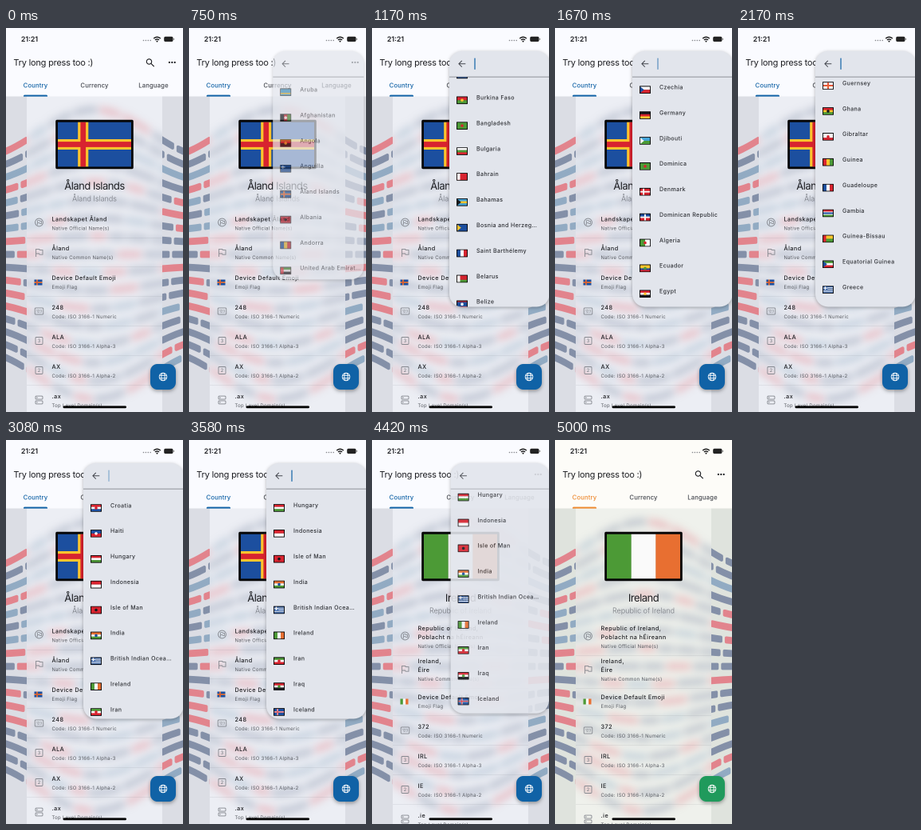
These frames come from a looping animation (222 px wide and 480 px high, 6.83 s). An HTML page with a canvas:

```html
<!DOCTYPE html>
<html lang="en">
<head>
<meta charset="utf-8">
<title>Countries</title>
<style>
html, body { margin: 0; width: 100%; height: 100%; overflow: hidden; background: #fafbff; }
canvas { display: block; width: 100vw; height: 100vh; }
</style>
</head>
<body>
<canvas id="stage"></canvas>
<script>
const W = 222, H = 480, LOOP = 6830, STEP = 1000 / 12;
const OPEN = 540, CLOSE = 4385, MORPH = 600, ROW = 31.88;
const SCALE = Math.max(2, Math.ceil(devicePixelRatio || 1));
const FONT = 'Inter, Roboto, sans-serif';

const makeLayer = el => {
  const c = el || document.createElement('canvas');
  c.width = W * SCALE;
  c.height = H * SCALE;
  const g = c.getContext('2d');
  g.scale(SCALE, SCALE);
  return g;
};
const stage = makeLayer(document.getElementById('stage'));
const sheet = makeLayer();

// Name:flag. h/v stripes, then * disc, + nordic cross, = cross, < triangle, | hoist band, ^ canton
const COUNTRIES = (
  'Aruba:hcccyc;Afghanistan:vkrg*w;Angola:hrk*y;Anguilla:hb^;Åland Islands:hb+yr;Albania:hr*k;Andorra:vbyr;' +
  'United Arab Emirat…:hgwk|r;Argentina:hcwc*y;Armenia:hrbo;American Samoa:hb<w;Antarctica:hb*w;' +
  'French Southern Ter…:hb*w;Antigua and Barbu…:hkcw;Australia:hb^;Austria:hrwr;Azerbaijan:hcrg*w;' +
  'Burundi:hrg*w;Belgium:vkyr;Benin:hyr|g;Caribbean Netherl…:hwwb;Burkina Faso:hrg*y;Bangladesh:hg*r;' +
  'Bulgaria:hwgr;Bahrain:hr|w;Bahamas:hcyc<k;Bosnia and Herzeg…:hb<y;Saint Barthélemy:vbwr;' +
  'Belarus:hrrg|w;Belize:hrbbbbr*w;Bermuda:hr^;Bolivia:hryg;Brazil:hg*y;Barbados:vbyb*k;Brunei:hywky;' +
  'Bhutan:hyo*w;Bouvet Island:hr+wb;Botswana:hcckcc;Central African Re…:hbwgy;Canada:vrwwr*r;' +
  'Cocos Islands:hg*y;Switzerland:hr=ww;Chile:hwr|b;China:hr*y;Ivory Coast:vowg;Cameroon:vgry*y;' +
  'DR Congo:hc*y;Congo:vgyr;Cook Islands:hb^;Colombia:hyybr;Comoros:hywrb<g;Cape Verde:hbbwrwb;' +
  'Costa Rica:hbwrrwb;Cuba:hbwbwb<r;Curaçao:hbbbyb;Christmas Island:hbg*y;Cayman Islands:hb^;' +
  'Cyprus:hw*o;Czechia:hwr<b;Germany:hkry;Djibouti:hcg<w;Dominica:hg*r;Denmark:hr+ww;' +
  'Dominican Republic:hbr=ww;Algeria:vgw*r;Ecuador:hyybr*g;Egypt:hrwk*y;Eritrea:hgc<r;' +
  'Western Sahara:hkwg<r;Spain:hryyr*r;Estonia:hbkw;Ethiopia:hgyr*b;Finland:hw+bb;Fiji:hc^;' +
  'Falkland Islands:hb^;France:vbwr;Faroe Islands:hw+br;Micronesia:hc*w;Gabon:hgyb;' +
  'United Kingdom:hb=wr;Georgia:hw=rr;Guernsey:hw=ry;Ghana:hryg*k;Gibraltar:hwwr*r;Guinea:vryg;' +
  'Guadeloupe:vbwr;Gambia:hrrwbbwgg;Guinea-Bissau:hyg|r;Equatorial Guinea:hgwr<b;' +
  'Greece:hbwbwbwbwb^;Grenada:hryyr*g;Greenland:hwr*r;Guatemala:vcwc;French Guiana:hgy*r;' +
  'Guam:hb*w;Guyana:hg<y;Hong Kong:hr*w;Heard and McDon…:hb^;Honduras:hcwc*c;Croatia:hrwb*r;' +
  'Haiti:hbr*w;Hungary:hrwg;Indonesia:hrw;Isle of Man:hr*k;India:howg*b;' +
  'British Indian Ocea…:hbwbwbwb^;Ireland:vgwo;Iran:hgwr*r;Iraq:hrwk*g;Iceland:hb+wr;' +
  'Israel:hbwwb*b;Italy:vgwr;Jamaica:hgyk'
).split(';').map(s => s.split(':'));

const INK = { r: '#d8232f', w: '#fafafa', b: '#1c4f9f', g: '#4c9a36', y: '#fdc52d', o: '#e86f31', k: '#17181c', c: '#45a5d8' };

const THEMES = [
  { bar: [250, 251, 255], body: [219, 221, 228], mid: [236, 238, 244], tab: [16, 98, 166], fab: [16, 98, 166] },
  { bar: [253, 252, 248], body: [223, 227, 221], mid: [239, 241, 236], tab: [238, 138, 48], fab: [32, 154, 92] }
];

const PAGES = [
  { flag: 'hb+yr', title: 'Åland Islands', sub: 'Åland Islands', rows: [
    [243, 239, ['Landskapet Åland'], 'Native Official Name(s)'],
    [281, 275.5, ['Åland'], 'Native Common Name(s)'],
    [318, 312.5, ['Device Default Emoji'], 'Emoji Flag'],
    [354, 349.5, ['248'], 'Code: ISO 3166-1 Numeric'],
    [391, 386.5, ['ALA'], 'Code: ISO 3166-1 Alpha-3'],
    [428, 423.5, ['AX'], 'Code: ISO 3166-1 Alpha-2'],
    [465, 460.5, ['.ax'], 'Top Level Domain(s)']] },
  { flag: 'vgwo', title: 'Ireland', sub: 'Republic of Ireland', rows: [
    [245, 235.5, ['Republic of Ireland,', 'Poblacht na hÉireann'], 'Native Official Name(s)'],
    [287, 276.5, ['Ireland,', 'Éire'], 'Native Common Name(s)'],
    [327, 321.5, ['Device Default Emoji'], 'Emoji Flag'],
    [363, 358.5, ['372'], 'Code: ISO 3166-1 Numeric'],
    [400, 395.5, ['IRL'], 'Code: ISO 3166-1 Alpha-3'],
    [437, 432.5, ['IE'], 'Code: ISO 3166-1 Alpha-2'],
    [474, 469.5, ['.ie'], 'Top Level Domain(s)']] }
];

const clamp = v => Math.min(1, Math.max(0, v));
const span = (t, a, b) => clamp((t - a) / (b - a));
const mix = (a, b, k) => `rgb(${a.map((v, i) => Math.round(v + (b[i] - v) * k))})`;

function bezier(x1, y1, x2, y2, x) {
  const at = (a, b, s) => 3 * a * s * (1 - s) ** 2 + 3 * b * s * s * (1 - s) + s ** 3;
  let lo = 0, hi = 1;
  for (let i = 0; i < 24; i++) {
    const m = (lo + hi) / 2;
    if (at(x1, x2, m) < x) lo = m; else hi = m;
  }
  return at(y1, y2, lo);
}

// Material "emphasized" easing
function emphasized(u) {
  const k = 1 / 6;
  return u < k ? 0.4 * bezier(0.3, 0, 0.8, 0.15, u / k)
    : 0.4 + 0.6 * bezier(0.05, 0.7, 0.1, 1, (u - k) / (1 - k));
}

// A drag, then one long fling
function scrollAt(t) {
  const fling = 1166.7;
  if (t < fling) return 659.5 * span(t, 850, fling) ** 1.42;
  return 3221.5 - 2562 * (1 - span(t, fling, fling + 2880)) ** 3.285;
}

function rect(g, x, y, w, h, fill, r = 0) {
  g.fillStyle = fill;
  g.beginPath();
  g.roundRect(x, y, w, h, r);
  g.fill();
}
function disc(g, x, y, r, fill) {
  g.fillStyle = fill;
  g.beginPath();
  g.arc(x, y, r, 0, 7);
  g.fill();
}
function stroke(g, path, color, width = 0.9) {
  g.strokeStyle = color;
  g.lineWidth = width;
  g.stroke(new Path2D(path));
}
function text(g, s, x, y, size, { weight = 400, color = '#1b1c20', gap = 0, align = 'left' } = {}) {
  g.font = `${weight} ${size}px ${FONT}`;
  g.letterSpacing = gap + 'px';
  g.textAlign = align;
  g.fillStyle = color;
  g.fillText(s, x, y + size * 0.36);
}

function flag(g, spec, x, y, w, h) {
  const [, dir, bands, mark, tint] = /^([hv])([a-z]+)([*+=<|^]?)(\w*)$/.exec(spec);
  const n = bands.length;
  const [a, b] = [...tint].map(c => INK[c]);
  g.save();
  g.beginPath();
  g.rect(x, y, w, h);
  g.clip();
  [...bands].forEach((c, i) => {
    if (dir === 'h') rect(g, x, y + h * i / n, w, h / n + 0.1, INK[c]);
    else rect(g, x + w * i / n, y, w / n + 0.1, h, INK[c]);
  });
  const cross = (cx, width, color) => {
    rect(g, x + cx * w - width / 2, y, width, h, color);
    rect(g, x, y + (h - width) / 2, w, width, color);
  };
  if (mark === '*') disc(g, x + w / 2, y + h / 2, h * 0.22, a);
  if (mark === '|') rect(g, x, y, w * 0.3, h, a);
  if (mark === '+' || mark === '=') {
    const nordic = mark === '+', cx = nordic ? 0.345 : 0.5;
    cross(cx, h * 0.235, a);
    cross(cx, h * (nordic ? 0.12 : 0.06), b);
  }
  if (mark === '<') {
    g.fillStyle = a;
    g.fill(new Path2D(`M${x} ${y}l${w * 0.4} ${h / 2}l${-w * 0.4} ${h / 2}z`));
  }
  if (mark === '^') {
    rect(g, x, y, w * 0.45, h * 0.5, INK.b);
    rect(g, x + w * 0.17, y, w * 0.1, h * 0.5, INK.w);
    rect(g, x, y + h * 0.17, w * 0.45, h * 0.16, INK.w);
  }
  g.restore();
}

function framedFlag(g, spec, x, y, w, h, edge, r) {
  rect(g, x, y, w, h, '#070708', r);
  flag(g, spec, x + edge, y + edge, w - 2 * edge, h - 2 * edge);
}

// Arched rows of dashes, sharp at the sides and frosted in the middle
function makeDashes() {
  const raw = makeLayer(), out = makeLayer();
  let seed = 11;
  const rnd = () => (seed = seed * 16807 % 2147483647) / 2147483647;
  raw.lineJoin = 'round';
  raw.lineWidth = 4;
  for (let k = -8; k <= 8; k++) {
    const d = k * 22.6;
    const yAt = x => 283 + d * (1 - 0.165 * (1 - Math.cos(2.4 * (x / 111 - 1))));
    let x = -rnd() * 14;
    while (x < W) {
      const end = x + 16 + rnd() * 20, pick = rnd();
      raw.strokeStyle = raw.fillStyle = pick < 0.36 ? '#e2848d' : pick < 0.85 ? '#8490a8' : '#92abc3';
      raw.beginPath();
      for (let i = 0; i <= 4; i++) {
        const px = x + (end - x) * i / 4;
        raw.lineTo(px, yAt(px) - 2.4);
      }
      for (let i = 4; i >= 0; i--) {
        const px = x + (end - x) * i / 4;
        raw.lineTo(px, yAt(px) + 2.4);
      }
      raw.closePath();
      raw.fill();
      raw.stroke();
      x = end + 7;
    }
  }
  const part = (x, w, alpha, filter) => {
    out.save();
    out.beginPath();
    out.rect(x, 86, w, H);
    out.clip();
    out.globalAlpha = alpha;
    out.filter = filter;
    out.drawImage(raw.canvas, 0, 0, W, H);
    out.restore();
  };
  part(0, 26, 1, 'none');
  part(196, 26, 1, 'none');
  part(26, 170, 0.42, `blur(${5 * SCALE}px)`);
  return out.canvas;
}
const dashes = makeDashes();

function statusBar(g) {
  text(g, '21:21', 29.5, 14, 8.8, { weight: 600, align: 'center' });
  for (let i = 0; i < 4; i++) disc(g, 172.5 + i * 2.9, 15.5, 0.8, '#85878c');
  stroke(g, 'M185.2 13.1q4.3-3.6 8.6 0M186.9 15q2.6-2.2 5.2 0', '#111', 1.3);
  disc(g, 189.5, 16.6, 1, '#111');
  rect(g, 198.2, 10.7, 11.3, 6.4, '#222', 2);
  rect(g, 210.2, 12.7, 0.9, 2.4, '#777', 0.4);
}

function rowIcon(g, i, y, page) {
  const c = '#85888f';
  const box = (w, h, dy = 0) => {
    g.strokeStyle = c;
    g.lineWidth = 0.9;
    g.beginPath();
    g.roundRect(41.5 - w / 2, y + dy - h / 2, w, h, 1.2);
    g.stroke();
  };
  const label = (s, size) => text(g, s, 41.5, y, size, { color: c, weight: 500, align: 'center' });
  if (i === 0) {
    stroke(g, `M36.6 ${y}a4.9 4.9 0 1 1 9.8 0a4.9 4.9 0 1 1-9.8 0`, c);
    stroke(g, `M39.6 ${y + 3.2}v-5.6h2.6l.4 .9h2v2.9h-2.2l-.4-.8h-2.4`, c, 0.8);
  } else if (i === 1) stroke(g, `M37.6 ${y + 5}v-9.6h4.2l.5 1.2h3.7v5.6h-3.9l-.5-1.2h-4`, c);
  else if (i === 2) flag(g, page.flag, 35.5, y - 3.5, 10, 7);
  else if (i === 3) { box(10.5, 8.2); label('123', 4.4); }
  else if (i < 6) { box(9, 9); label(i === 4 ? '3' : '2', 6); }
  else {
    for (const dy of [-2.9, 2.9]) {
      box(9, 4, dy);
      disc(g, 39, y + dy, 0.7, c);
    }
  }
}

function drawPage(g, page, k, anchorAlpha) {
  const [from, to] = THEMES;
  const tone = key => mix(from[key], to[key], k);
  rect(g, 0, 0, W, H, tone('body'));
  rect(g, 26, 85, 170, H, tone('mid'));
  g.drawImage(dashes, 0, 0, W, H);
  rect(g, 0, 0, W, 85.5, tone('bar'));
  statusBar(g);

  text(g, 'Try long press too :)', 9.4, 43, 11, { gap: -0.22 });
  g.globalAlpha = anchorAlpha;
  stroke(g, 'M182.7 42a3.2 3.2 0 1 1-6.4 0a3.2 3.2 0 1 1 6.4 0M181.9 44.4l3.8 3.8', '#1b1c20', 1.1);
  g.globalAlpha = 1;
  for (let i = 0; i < 3; i++) disc(g, 204.9 + i * 3.4, 43, 1.1, '#1b1c20');

  ['Country', 'Currency', 'Language'].forEach((s, i) => text(g, s, 37 + 74 * i, 71.5, 7.7,
    { weight: 500, gap: 0.14, align: 'center', color: i ? '#44474e' : tone('tab') }));
  rect(g, 22, 83.6, 30, 2, tone('tab'), [1.5, 1.5, 0, 0]);

  framedFlag(g, page.flag, 62.2, 114.8, 97.6, 61.4, 2.8, 2);
  text(g, page.title, 111, 197.5, 13, { gap: -0.5, align: 'center' });
  text(g, page.sub, 111, 213.5, 9, { weight: 300, color: '#73767d', align: 'center' });

  page.rows.forEach(([iconY, y, lines, note], i) => {
    rowIcon(g, i, iconY, page);
    lines.forEach((s, j) => text(g, s, 57.5, y + j * 11, 7.2, { weight: 500, gap: 0.48 }));
    const noteY = y + lines.length * 11 + 0.5;
    text(g, note, 57.5, noteY, 5.9, { gap: 0.34, color: '#55585f' });
    rect(g, 26, noteY + 11.5, 170, 0.5, 'rgba(110,114,124,.22)');
  });

  g.save();
  g.shadowColor = 'rgba(0,0,0,.35)';
  g.shadowBlur = 5 * SCALE;
  g.shadowOffsetY = 2 * SCALE;
  rect(g, 181, 420, 32, 32, tone('fab'), 9);
  g.restore();
  stroke(g, 'M192.2 436a4.8 4.8 0 1 1 9.6 0a4.8 4.8 0 1 1-9.6 0M194.8 436a2.2 4.8 0 1 1 4.4 0a2.2 4.8 0 1 1-4.4 0M192.7 434.3h8.6M192.7 437.7h8.6', '#fff', 0.9);
  rect(g, 71.5, 472.4, 79.5, 2.8, '#050505', 1.4);
}

function drawSheet(t) {
  const closing = t >= CLOSE;
  const u = (t - (closing ? CLOSE : OPEN)) / MORPH;
  if (u < 0 || (closing && u >= 0.5)) return;
  const show = (a, b) => closing ? 1 - span(u, a, b) : span(u, a, b);
  const ease = emphasized(clamp(u));
  const p = closing ? ease : 1 - ease;
  const x = 97 + 70 * p, w = 125.5 - 98 * p, h = 319.5 - 292 * p;

  const g = sheet;
  g.clearRect(0, 0, W, H);
  g.save();
  g.shadowColor = 'rgba(0,0,0,.3)';
  g.shadowBlur = 4 * SCALE;
  g.shadowOffsetY = SCALE;
  rect(g, x, 29, w, h, '#e2e5ec', Math.min(16, h / 2));
  g.restore();
  g.save();
  g.beginPath();
  g.roundRect(x, 29, w, h, Math.min(16, h / 2));
  g.clip();
  g.translate(x - 97, 0);

  g.globalAlpha = show(1 / 6, 1 / 3);
  stroke(g, 'M117.3 44.8h-8.2M112.8 40.9l-3.9 3.9l3.9 3.9', '#44474e', 1);
  if (!closing) {
    const phase = t % 1000;
    g.globalAlpha *= span(phase, 45, 130) * (1 - span(phase, 620, 750));
    rect(g, 128.4, 37.5, 1.2, 14.5, '#1062a6', 0.6);
  }
  g.globalAlpha = show(0, 1 / 6);
  rect(g, 97, 60.8, 126, 0.7, '#74777f');

  g.globalAlpha = show(133 / 600, 233 / 600);
  g.beginPath();
  g.rect(97, 61.5, 126, H);
  g.clip();
  const top = 77 - scrollAt(t) - (closing ? 7 * clamp(p / 0.022) : 0);
  COUNTRIES.forEach(([name, spec], i) => {
    const y = top + i * ROW;
    if (y < 40 || y > 365) return;
    framedFlag(g, spec, 106, y - 1.6, 14, 9.6, 0.8, 0.5);
    text(g, name, 131, y, 7, { weight: 500, gap: 0.38, color: '#2c2e33' });
  });
  g.restore();

  stage.globalAlpha = show(0, 0.5);
  stage.drawImage(g.canvas, 0, 0, W, H);
  stage.globalAlpha = 1;
}

function render(now) {
  const t = Math.floor((now % LOOP + 4) / STEP) * STEP;
  const anchor = 1 - span(t, OPEN, OPEN + 75) + span(t, 4600, 4680);
  drawPage(stage, PAGES[t < CLOSE ? 0 : 1], span(t, 4620, 4820), anchor);
  drawSheet(t);
}

const start = performance.now();
function tick() {
  render(performance.now() - start);
  requestAnimationFrame(tick);
}
tick();
</script>
</body>
</html>
```
